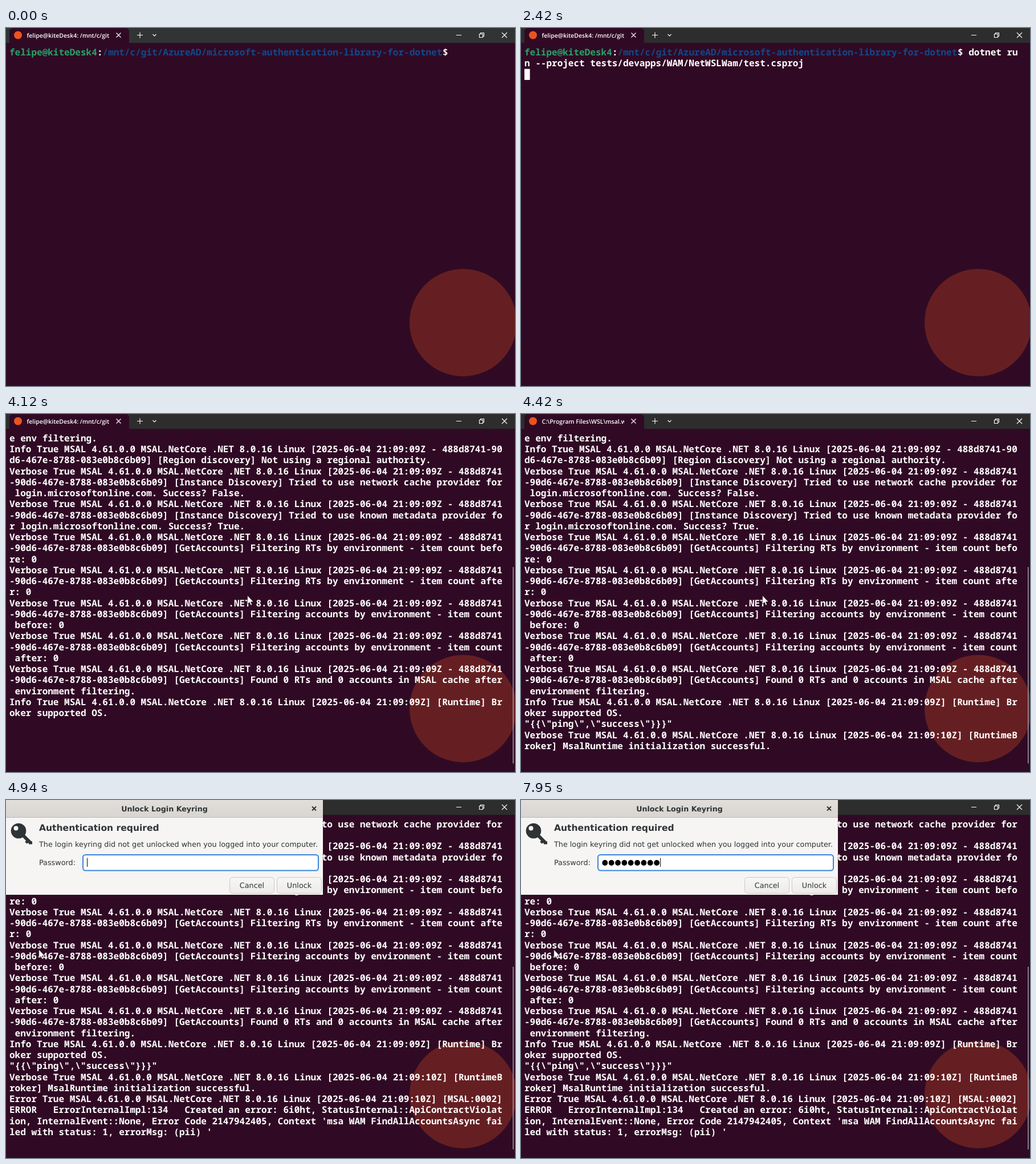
An HTML page with a canvas for the animation above (8 s loop, 893 by 627 pixels).

```html
<!DOCTYPE html>
<html lang="en">
<head>
<meta charset="utf-8">
<title>Terminal login</title>
<style>
html, body { margin: 0; height: 100%; overflow: hidden; background: #300a24; }
canvas { display: block; }
</style>
</head>
<body>
<canvas id="stage" width="893" height="627"></canvas>
<script>
const ctx = document.getElementById('stage').getContext('2d');
const LOOP = 8000, COLS = 90, CELL = 9.62, ROW = 19.25, LEFT = 6, TOP = 33.2;
const MONO = '600 16.03px "Noto Sans Mono", monospace';
const UI = '"DejaVu Sans", sans-serif';
const INK = '#2e3436';

// Terminal content
const user = 'felipe@kiteDesk4';
const path = '/mnt/c/git/AzureAD/microsoft-authentication-library-for-dotnet';
const prompt = user + ':' + path + '$ ';
const command = 'dotnet run --project tests/devapps/WAM/NetWSLWam/test.csproj';

const head = (level, sec, id = ' - 488d8741-90d6-467e-8788-083e0b8c6b09') =>
  `${level} True MSAL 4.61.0.0 MSAL.NetCore .NET 8.0.16 Linux [2025-06-04 21:09:${sec}Z${id}] `;
const verbose = text => head('Verbose', '09') + text;
const provider = (name, ok) => verbose(
  `[Instance Discovery] Tried to use ${name} provider for login.microsoftonline.com. Success? ${ok}.`);
const count = (what, when) => verbose(
  `[GetAccounts] Filtering ${what} by environment - item count ${when}: 0`);
const wrap = text => text.match(new RegExp(`.{1,${COLS}}`, 'g'));

const log = [
  'e env filtering.',
  head('Info', '09') + '[Region discovery] Not using a regional authority.',
  provider('network cache', 'False'),
  provider('known metadata', 'True'),
  count('RTs', 'before'), count('RTs', 'after'),
  count('accounts', 'before'), count('accounts', 'after'),
  verbose('[GetAccounts] Found 0 RTs and 0 accounts in MSAL cache after environment filtering.'),
  head('Info', '09', '') + '[Runtime] Broker supported OS.',
  '"{{\\"ping\\",\\"success\\"}}}"',
  head('Verbose', '10', '') + '[RuntimeBroker] MsalRuntime initialization successful.',
  head('Error', '10', '') + '[MSAL:0002]' +
    'ERROR   ErrorInternalImpl:134   Created an error: 6i0ht, StatusInternal::ApiContractViolation, ' +
    "InternalEvent::None, Error Code 2147942405, Context 'msa WAM FindAllAccountsAsync failed with status: 1, errorMsg: (pii) '"
].flatMap(wrap);

// Timed states: [start, ...values]
const pointerSteps = [
  [0], [610, 511, 596], [710, 490, 470], [810, 479, 375], [910, 476, 308], [1010, 481, 203],
  [1110, 479, 103], [1210, 475, 60], [1310, 481, 72], [1410, 492, 104], [1510],
  [2830, 492, 104], [3030, 495, 111], [3120, 500, 124], [3220, 503, 133],
  [3420, 495, 170], [3520, 472, 225], [3620, 448, 274], [3720, 431, 307], [3820, 424, 318],
  [4830, 240, 290], [4940, 58, 262]
];
const caretSteps = [[0], [1610, 51, 1], [2120], [2420, 0, 2], [3030], [3520, 0, 2], [4120]];
const logSteps = [[0, 0, 0], [4120, 0, 26], [4420, 0, 29], [4720, 4, 33]];
const keyTimes = [5640, 5970, 5970, 6150, 6250, 6650, 7550, 7750, 7950];
const at = (steps, t) => steps.findLast(s => s[0] <= t).slice(1);

function text(str, x, y, font, color, align = 'left') {
  ctx.font = font;
  ctx.fillStyle = color;
  ctx.textAlign = align;
  ctx.fillText(str, x, y);
}
function rect(x, y, w, h, fill, radius = 0, stroke, width = 1) {
  ctx.beginPath();
  ctx.roundRect(x, y, w, h, radius);
  ctx.fillStyle = fill;
  ctx.fill();
  if (stroke) {
    ctx.strokeStyle = stroke;
    ctx.lineWidth = width;
    ctx.stroke();
  }
}
function strokePath(d, color, width) {
  ctx.strokeStyle = color;
  ctx.lineWidth = width;
  ctx.stroke(new Path2D(d));
}
function disc(x, y, r, color) {
  ctx.beginPath();
  ctx.arc(x, y, r, 0, 7);
  ctx.fillStyle = color;
  ctx.fill();
}
function shade(y, h, from, to) {
  const g = ctx.createLinearGradient(0, y, 0, y + h);
  g.addColorStop(0, from);
  g.addColorStop(1, to);
  return g;
}
const cellText = (str, col, row, color = '#fff') =>
  text(str, LEFT + col * CELL, TOP + row * ROW + 14.7, MONO, color);

function drawTabs(t) {
  rect(0, 0, 893, 26, t < 1510 ? '#313434' : '#2d2d2d');
  rect(6, 0, 210, 27, '#300a24', [6, 6, 0, 0]);
  disc(21, 12.5, 7, '#e95420');
  ctx.save();
  ctx.beginPath();
  ctx.rect(36, 0, 145, 26);
  ctx.clip();
  const title = t < 4320 ? user + ': /mnt/c/git' : 'C:\\Program Files\\WSL\\msal.wsl.proxy.exe';
  text(title, 36.5, 17, '600 10.5px "Open Sans", sans-serif', '#fff');
  ctx.restore();
  strokePath('M193.5 8.5l8 8m0-8l-8 8M230 12.5h10m-5-5v10M257.5 11l3 3l3-3', '#fff', 1.1);
  strokePath('M790 12.5h9M830.5 10.5h6v6h-6zM832.5 10.5v-2h6v6h-2M870 8l9 9m0-9l-9 9', '#fff', 1.1);
}

function drawTerminal(t) {
  rect(0, 0, 893, 627, '#300a24');
  disc(802, 516, 94, '#651f22');
  const [first, last] = at(logSteps, t);
  if (last) {
    log.slice(first, last).forEach((str, i) => cellText(str, 0, i));
    const y = first ? 292 : 268;
    rect(889, y, 1.6, 612 - y, '#a295a0');
    return;
  }
  cellText(user, 0, 0, '#26a269');
  cellText(':', user.length, 0);
  cellText(path, user.length + 1, 0, '#12488b');
  cellText('$', prompt.length - 2, 0);
  if (t >= 1610) {
    const room = COLS - prompt.length;
    cellText(command.slice(0, room), prompt.length, 0);
    cellText(command.slice(room), 0, 1);
  }
  const [col, row] = at(caretSteps, t);
  if (row) rect(LEFT + col * CELL, TOP + row * ROW, CELL, ROW, '#fff');
}

function drawPointer(t) {
  const [x, y] = at(pointerSteps, t);
  if (!x) return;
  const arrow = new Path2D('M0 0V15L3.4 11.8L5.7 17L8 16L5.8 11H10.5Z');
  ctx.save();
  ctx.translate(x - 0.3, y);
  ctx.fillStyle = '#fff';
  ctx.fill(arrow);
  ctx.strokeStyle = '#1a0614';
  ctx.lineWidth = 0.6;
  ctx.stroke(arrow);
  ctx.restore();
}

function button(x, label) {
  rect(x + 0.5, 135.5, 78, 28, shade(135, 29, '#f8f7f6', '#edebe9'), 5, '#cdc7c2');
  text(label, x + 39.5, 154, '12.8px ' + UI, INK, 'center');
}

function drawDialog(t) {
  rect(0, 0, 556, 166, '#f6f5f4');
  rect(0, 0, 556, 31, shade(0, 31, '#e1dedb', '#d8d4d0'));
  rect(0, 30, 556, 1, '#bfb8b1');
  text('Unlock Login Keyring', 278, 19.5, 'bold 12.7px ' + UI, INK, 'center');
  strokePath('M537 11.5l7 7m0-7l-7 7', INK, 2);

  disc(22, 54, 13.3, INK);
  strokePath('M27 59L43 75', INK, 6);
  strokePath('M35 75l4-4M40 75H46', INK, 5);
  disc(17.5, 49.5, 4, '#f6f5f4');

  text('Authentication required', 58, 53.5, 'bold 15.55px ' + UI, INK);
  text('The login keyring did not get unlocked when you logged into your computer.',
    58, 82, '12.77px ' + UI, INK);
  text('Password:', 58, 114, '12.77px ' + UI, INK);
  rect(135, 96, 413, 27.5, '#fff', 4.5, '#3a85dc', 2);
  const typed = keyTimes.filter(k => k <= t).length;
  for (let i = 0; i < typed; i++) disc(147.3 + i * 11.35, 110, 4.9, '#000');
  rect(142 + typed * 11.35, 101.5, 1, 15.5, '#000');

  button(392, 'Cancel');
  button(475, 'Unlock');
}

function frame() {
  const t = performance.now() % LOOP;
  ctx.textRendering = 'geometricPrecision';
  drawTerminal(t);
  drawTabs(t);
  if (t >= 4830) drawDialog(t);
  drawPointer(t);
  requestAnimationFrame(frame);
}
frame();
</script>
</body>
</html>
```
